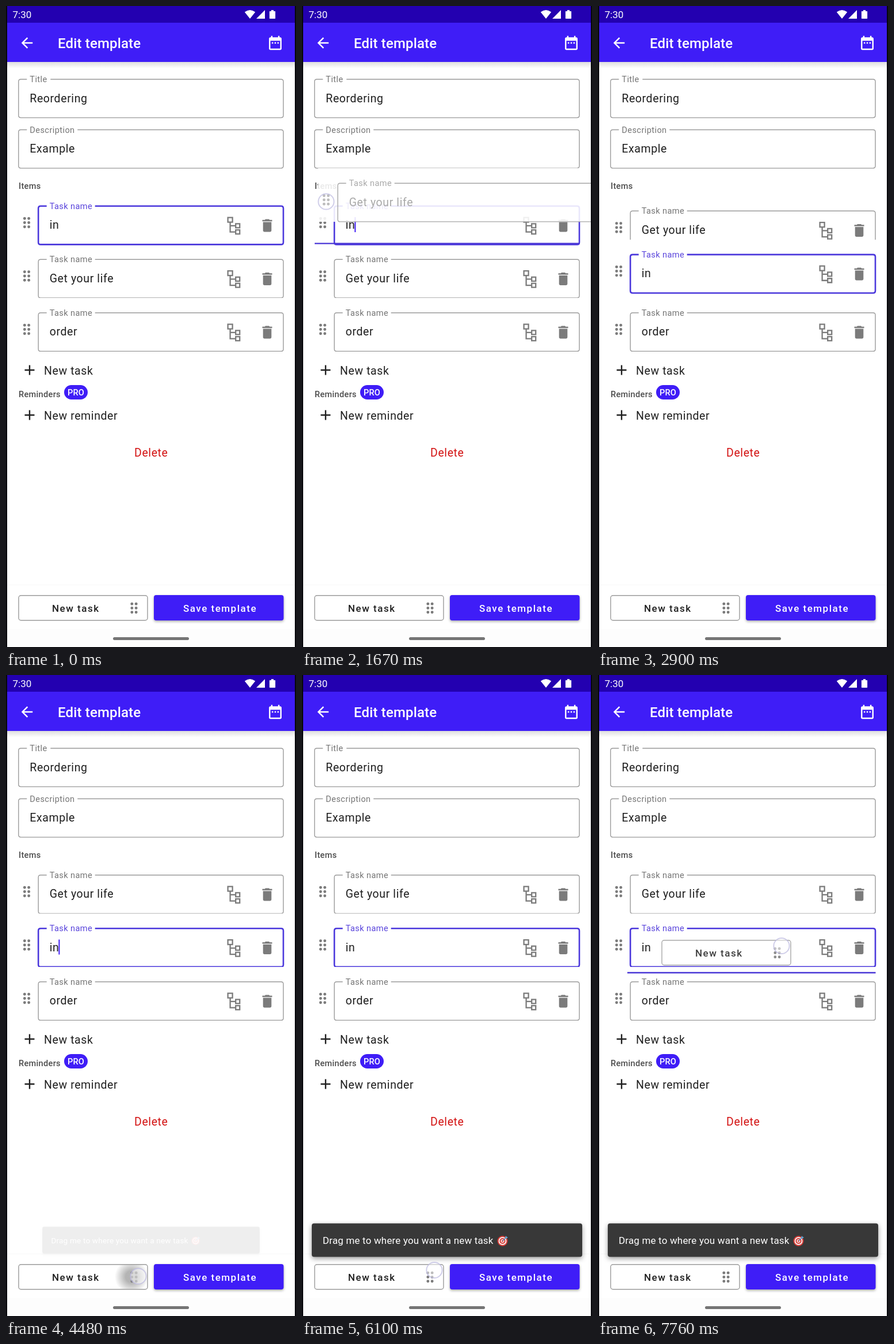
An HTML page that plays this animation: 504x1111 px, repeating every 8000 ms.

```html
<!DOCTYPE html>
<html lang="en">
<head>
<meta charset="utf-8">
<title>Edit template</title>
<style>
  html, body { margin: 0; width: 100%; height: 100%; overflow: hidden; background: #fff; }
  svg { display: block; width: 504px; height: 1111px; font-family: Roboto, sans-serif; }
  .body { font-size: 19.5px; letter-spacing: .6px; fill: #1f1f1f; }
  .label { font-size: 14.6px; letter-spacing: .4px; fill: #757575; }
  .head { font-size: 14.6px; letter-spacing: .3px; font-weight: 500; fill: #4c4c4c; }
  .button { font-size: 17px; letter-spacing: 1.5px; font-weight: 500; fill: #1f1f1f; }
  .border { fill: none; stroke: #9b9b9b; stroke-width: 1.4; }
  .focus .border { stroke: #4b38dc; stroke-width: 2.6; }
  .focus .label { fill: #5a45dc; }
  .icon { fill: #7b7b7b; }
  .disabled .body, .disabled .label { fill: #a9a9a9; }
  .disabled .border { stroke: #a6a6a6; }
</style>
</head>
<body>
<svg id="stage" viewBox="0 0 504 1111"></svg>
<script>
const ACCENT = '#3f1df7';
const ROW = 92.5;
const LOOP = 8000;

const icons = {
  back: 'M20 11H7.83l5.59-5.59L12 4l-8 8 8 8 1.41-1.41L7.83 13H20z',
  calendar: 'M9 11H7v2h2zm4 0h-2v2h2zm4 0h-2v2h2zm2-7h-1V2h-2v2H8V2H6v2H5c-1.1 0-2 .9-2 2v14c0 1.1.9 2 2 2h14c1.1 0 2-.9 2-2V6c0-1.1-.9-2-2-2zm0 16H5V9h14z',
  trash: 'M6 19c0 1.1.9 2 2 2h8c1.1 0 2-.9 2-2V7H6zM19 4h-3.5l-1-1h-5l-1 1H5v2h14z'
};

const text = (cls, x, y, s, more = '') => `<text class="${cls}" x="${x}" y="${y}" ${more}>${s}</text>`;
const rect = (x, y, w, h, more = '') => `<rect x="${x}" y="${y}" width="${w}" height="${h}" ${more}/>`;
const icon = (name, cx, cy, fill) =>
  `<path d="${icons[name]}" fill="${fill}" fill-rule="evenodd" transform="translate(${cx - 14.6} ${cy - 14.6}) scale(1.217)"/>`;
const plus = (cx, cy) =>
  `<path d="M${cx - 8.5} ${cy}h17M${cx} ${cy - 8.5}v17" stroke="#1f1f1f" stroke-width="2.4"/>`;

function dots(cx, cy) {
  let out = '';
  for (const dx of [-3.65, 3.65])
    for (const dy of [-7.3, 0, 7.3])
      out += `<circle class="icon" cx="${cx + dx}" cy="${cy + dy}" r="2.45"/>`;
  return out;
}

// Outlined text field with a gap in the top edge for its label
function field(x, y, w, label, labelWidth, value) {
  const h = 66.6, r = 4, tx = x + 19.5;
  return `<path class="border" d="M${tx - 5} ${y}H${x + r}q${-r} 0 ${-r} ${r}v${h - 2 * r}q0 ${r} ${r} ${r}
    h${w - 2 * r}q${r} 0 ${r} ${-r}v${2 * r - h}q0 ${-r} ${-r} ${-r}H${tx + labelWidth + 5}"/>`
    + text('label', tx, y + 5, label) + text('body', tx, y + 39.6, value);
}

const tree = `<path d="M385.6 366.6h8v8h-8zM399.2 377.4h7v7h-7zM399.2 388.2h7v7h-7zM389.6 374.6v17.1h9.6M389.6 380.9h9.6"
  fill="none" stroke="#7b7b7b" stroke-width="2.3"/>`;

const row = (id, value, cls = '', extra = '') => `<g id="${id}" class="${cls}">
  ${rect(21, 321, 462, 93.2, 'fill="#fff"')}${dots(36, 375.5)}
  ${field(56.2, 346.8, 425.8, 'Task name', 74, value)}${tree}${icon('trash', 454, 380.5, '#7b7b7b')}${extra}</g>`;

const outlined = `<rect class="border" x="22" y="1021.7" width="224" height="43" rx="4"/>`
  + text('button', 80, 1049.8, 'New task') + dots(222.5, 1043.5);

const target = [[9, '#d93a35'], [7, '#f4ecea'], [5, '#d93a35'], [3, '#f4ecea'], [1.5, '#d93a35']]
  .map(([r, c]) => `<circle cx="348.5" cy="981" r="${r}" fill="${c}"/>`).join('')
  + '<path d="M349 980.5l6-6" stroke="#4b86b8" stroke-width="1.5"/><path d="M353 976l1-4 2 2 2 .5-3 2.5z" fill="#62a7d6"/>';

document.getElementById('stage').innerHTML = `
  <defs>
    <linearGradient id="fade" x2="0" y2="1"><stop stop-opacity=".13"/><stop offset="1" stop-opacity="0"/></linearGradient>
    <radialGradient id="soft"><stop offset=".35" stop-color="#777"/><stop offset="1" stop-color="#777" stop-opacity="0"/></radialGradient>
    <clipPath id="screen">${rect(2, 0, 500, 1111)}</clipPath>
    <clipPath id="buttonClip">${rect(22, 1021, 224, 44, 'rx="4"')}</clipPath>
  </defs>
  ${rect(0, 0, 504, 1111, 'fill="#08080c"')}
  <g clip-path="url(#screen)">
    ${rect(1.7, 0, 500.6, 1111, 'fill="#fff"')}
    ${field(21.8, 127, 460.2, 'Title', 31, 'Reordering')}
    ${field(21.8, 214.5, 460.2, 'Description', 78, 'Example')}
    ${text('head', 22, 317, 'Items')}
    ${row('getRow', 'Get your life')}
    ${row('inRow', 'in', 'focus', rect(91.4, 366, 2, 26, `id="caret" fill="${ACCENT}"`))}
    <g transform="translate(0 ${2 * ROW})">${row('orderRow', 'order')}</g>
    ${plus(41, 631)}${text('body', 66, 638.5, 'New task')}
    ${text('head', 22, 678, 'Reminders')}
    ${rect(101, 657, 41, 25, `rx="12.5" fill="${ACCENT}"`)}
    ${text('', 121.5, 675, 'PRO', 'font-size="14.6" font-weight="500" fill="#fff" text-anchor="middle" letter-spacing=".2"')}
    ${plus(41, 709)}${text('body', 66, 716.5, 'New reminder')}
    ${text('body', 223, 781, 'Delete', 'style="fill:#d31212"')}
    <path id="dropLine" stroke="#4936d6" stroke-width="2.4"/>

    ${rect(2, 97, 500, 11, 'fill="url(#fade)"')}
    ${rect(2, 0, 500, 29, 'fill="#2300b0"')}
    ${rect(2, 29, 500, 68, `fill="${ACCENT}"`)}
    ${text('', 11.5, 21, '7:30', 'font-size="17" fill="#fff"')}
    <path fill="#fff" d="M424 22L414.8 10.6Q424 3.4 433.2 10.6zM435 22h15V7zM458.5 9h2.5V7h4v2h2.5q.6 0 .6.7v11.6q0 .7-.6.7h-9q-.6 0-.6-.7V9.700q0-.7.6-.7z"/>
    ${icon('back', 36.5, 64, '#fff')}${icon('calendar', 468, 64, '#fff')}
    ${text('', 90, 72.500, 'Edit template', 'font-size="24" font-weight="500" letter-spacing=".15" fill="#fff"')}

    ${rect(2, 1003, 500, 108, 'fill="#fff"')}
    ${rect(2, 1003, 500, 1, 'fill="#f8f8f8"')}
    ${rect(2, 1080, 500, 31, 'fill="#fdfdfd"')}
    ${rect(186, 1094, 132, 5, 'rx="2.5" fill="#757575"')}
    <g clip-path="url(#buttonClip)"><circle id="ripple" cx="218" cy="1043" fill="url(#soft)"/></g>
    ${outlined}
    ${rect(257, 1021, 225.5, 44, `rx="4" fill="${ACCENT}" style="filter:drop-shadow(0 2px 2px #0005)"`)}
    ${text('button', 308, 1049.8, 'Save template', 'style="fill:#fff"')}

    <g id="snackbar">
      ${rect(17, 950.5, 470, 58, 'rx="4" fill="#383838" style="filter:drop-shadow(0 3px 4px #0006)"')}
      ${text('', 36, 986, 'Drag me to where you want a new task', 'font-size="17" letter-spacing=".17" fill="#fff"')}
      ${target}
    </g>

    <g id="rowShadow" class="disabled">
      ${rect(22, 413, 560, 93, 'fill="#fff" opacity=".88"')}
      ${dots(36, 468)}${field(56.2, 439.3, 520, 'Task name', 74, 'Get your life')}
    </g>
    <g id="buttonShadow" opacity=".86">${rect(22, 1021.7, 224, 43, 'rx="4" fill="#fff"')}${outlined}</g>
    <circle id="touch" r="13.6" fill="#fff" fill-opacity=".5" stroke="#bcb9e0" stroke-opacity=".7" stroke-width="2"/>
  </g>`;

const $ = id => document.getElementById(id);
const clamp = v => Math.min(1, Math.max(0, v));
const smooth = v => (v = clamp(v)) * v * (3 - 2 * v);
const mix = (a, b, p) => a + (b - a) * p;
const show = (id, on) => $(id).setAttribute('visibility', on ? 'visible' : 'hidden');
const move = (id, [x, y]) => $(id).setAttribute('transform', `translate(${x} ${y})`);

// Progress of a critically damped spring released at start
function spring(t, start, omega) {
  const x = Math.max(0, t - start) / 1000 * omega;
  return 1 - (1 + x) * Math.exp(-x);
}

function along(keys, t) {
  if (t <= keys[0][0]) return keys[0].slice(1);
  for (let i = 1; i < keys.length; i++) {
    const [t0, x0, y0] = keys[i - 1], [t1, x1, y1] = keys[i];
    if (t < t1) return [mix(x0, x1, (t - t0) / (t1 - t0)), mix(y0, y1, (t - t0) / (t1 - t0))];
  }
  return keys[keys.length - 1].slice(1);
}

// Finger travel: time, dx, dy
const rowDrag = [[1440, 0, 0], [1500, 1, -24], [1570, 3, -82], [1630, 5, -126], [1670, 6, -132],
  [1800, 9, -152], [1950, 13, -172], [2570, 14, -195]];
const buttonDrag = [[6110, 0, 0], [6200, 0, -50], [6330, -4, -278], [6450, -9, -441], [6570, -12, -554],
  [6660, -15, -572], [6860, -16, -577]];
const LAG = 19;

function buttonTravel(t) {
  const [x, y] = along(buttonDrag, t), p = smooth((t - 7140) / 480);
  return [x + 105 * p, y + 15 * p];
}

function drawTouch(t) {
  let at = null;
  if (t >= 1190 && t < 2700) {
    const [x, y] = along(rowDrag, t);
    at = [36 + x, 471 + y];
  } else if (t >= 4380 && t < 4530) {
    at = [230, 1042];
  } else if (t >= 5710) {
    const [x, y] = buttonTravel(t);
    at = [230 + x, 1031.5 + y];
  }
  show('touch', at);
  if (at) move('touch', at);
}

function drawLine(t) {
  const first = t >= 1440 && t < 2700, second = t >= 6200;
  show('dropLine', first || second);
  const y = first ? 423.5 - ROW * spring(t, 1654, 38.7) : 608.5 - ROW * spring(t, 6571, 38.7);
  const x = 22 + 29 * spring(t, 7330, 38.7);
  $('dropLine').setAttribute('d', `M${x} ${y}H482.5`);
}

function drawRipple(t) {
  const age = t - (t < 5000 ? 4380 : 5710);
  const alive = age >= 0 && age < 380;
  show('ripple', alive);
  if (!alive) return;
  $('ripple').setAttribute('r', mix(12, 36, clamp(age / 140)));
  $('ripple').setAttribute('opacity', .55 * clamp(age / 50) * clamp((380 - age) / 260));
}

function drawSnackbar(t) {
  const p = clamp((t - 4468) / 150), s = mix(.8, 1, smooth(p));
  $('snackbar').setAttribute('opacity', p);
  $('snackbar').setAttribute('transform', `translate(252 979.5) scale(${s}) translate(-252 -979.5)`);
}

function draw(now) {
  const t = now % LOOP;
  const swap = spring(t, 2700, 20);
  move('getRow', [0, ROW * (1 - swap)]);
  move('inRow', [0, ROW * swap]);
  show('caret', (t + 760) % 1000 < 500);

  show('rowShadow', t >= 1440 && t < 2700);
  move('rowShadow', along(rowDrag, t));
  show('buttonShadow', t >= 6110);
  move('buttonShadow', buttonTravel(t - LAG));

  drawLine(t);
  drawTouch(t);
  drawRipple(t);
  drawSnackbar(t);
}

let start;
function tick(now) {
  start ??= now;
  draw(now - start);
  requestAnimationFrame(tick);
}
draw(0);
requestAnimationFrame(tick);
</script>
</body>
</html>
```
